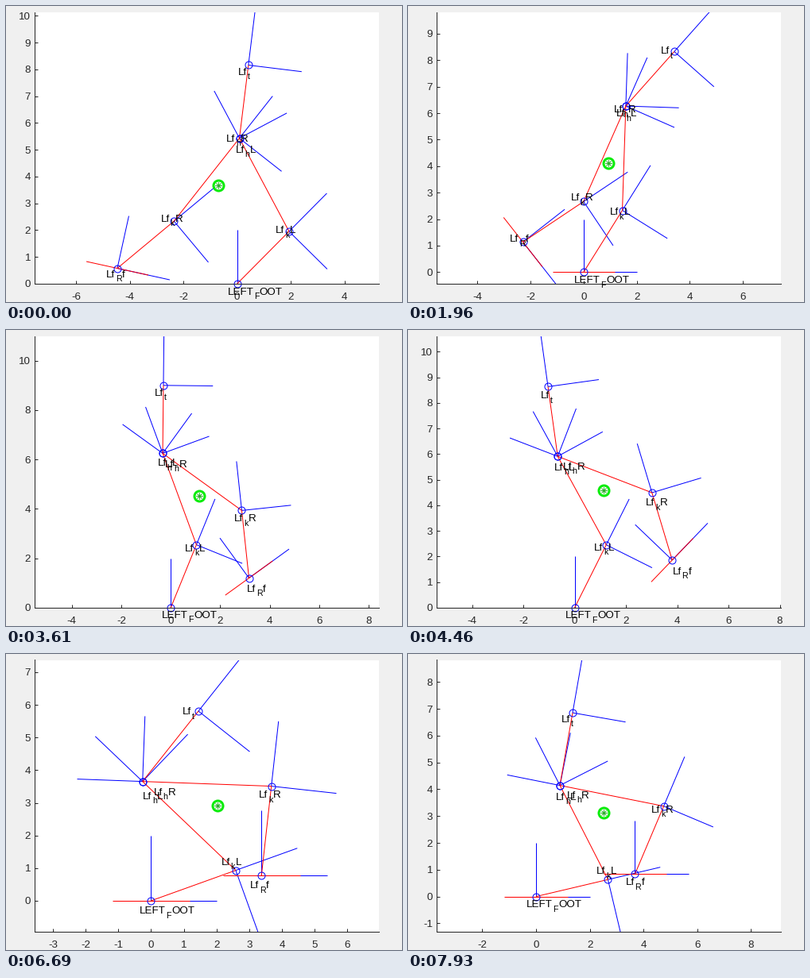
Animation, 498 px wide and 373 px high, one loop 8000 ms. Source, as a matplotlib script:

```python
import math

import numpy as np
import matplotlib.pyplot as plt
from matplotlib.animation import FuncAnimation
from matplotlib.collections import LineCollection
from matplotlib.textpath import TextPath
from matplotlib.ticker import FuncFormatter, MultipleLocator

W, H = 498, 373
LEFT, RIGHT, TOP, BOTTOM = 36, 469, 7.5, 350
LOOP, INTERVAL, STEPS = 8000, 40, 56
SHANK, THIGH, TORSO, FOOT, AXIS = 2.75, 3.94, 2.75, 1.18, 2.0
FONT, SUB = 13.33, 10.67
INK = "#262626"

plt.rcParams.update({"font.family": "Liberation Sans", "font.size": FONT,
                     "axes.unicode_minus": False})

# Key poses of the stride: link directions in degrees at a few steps.
KEY_STEPS = np.array([0, 14, 21, 32, 39, 47, 56])
POSES = np.array([
    [45.3, 58, 69.3, 63.4, 41.4, 19.8, 13.3],            # left shank
    [118, 88.1, 103.2, 118.7, 136.3, 136.3, 117],        # left thigh
    [83, 48.4, 76, 97.9, 82.3, 51.6, 80.1],              # torso
    [231.8, 246.2, 300.6, 338.9, 339.5, 357.9, 348.7],   # right thigh
    [219.8, 213.8, 258.4, 286.7, 269.8, 263.7, 247.1],   # right shank
    [-12.4, -51.9, 17.2, 46.2, 0, 0, 0],                 # right foot
]).T

LABELS = ["LEFT_FOOT", "Lf_kL", "Lf_hL", "Lf_t", "Lf_hR", "Lf_kR", "Lf_Rf"]


def unit(deg):
    a = math.radians(deg)
    return np.array([math.cos(a), math.sin(a)])


def monotone(x, xs, ys):
    """Cubic through the points, without overshoot."""
    h = np.diff(xs)
    s = np.diff(ys, axis=0) / h[:, None]
    m = np.vstack([s[:1], np.zeros_like(s[1:]), s[-1:]])
    p = s[:-1] * s[1:]
    same = p > 0
    m[1:-1][same] = 2 * p[same] / (s[:-1] + s[1:])[same]
    k = min(np.searchsorted(xs, x, side="right") - 1, len(h) - 1)
    u = (x - xs[k]) / h[k]
    return ((1 + 2 * u) * (1 - u) ** 2 * ys[k] + u * (1 - u) ** 2 * h[k] * m[k]
            + u * u * (3 - 2 * u) * ys[k + 1] + u * u * (u - 1) * h[k] * m[k + 1])


def advance(text, size):
    def right(s):
        return TextPath((0, 0), s, size=size).get_extents().x1
    return right(text + "|") - right("|")


fig = plt.figure(figsize=(W / 72, H / 72), dpi=72, facecolor="#f0f0f0")
ax = fig.add_axes([LEFT / W, 1 - BOTTOM / H, (RIGHT - LEFT) / W, (BOTTOM - TOP) / H])
for side in ("top", "right"):
    ax.spines[side].set_visible(False)
for side in ("left", "bottom"):
    ax.spines[side].set(color=INK, linewidth=1)
ax.tick_params(direction="in", length=4, width=1, color=INK, labelcolor=INK)
ax.tick_params(axis="x", pad=10.5)
ax.tick_params(axis="y", pad=5)
for axis in (ax.xaxis, ax.yaxis):
    axis.set_major_formatter(FuncFormatter(lambda v, _: f"{round(v)}"))

blue = LineCollection([], colors="#0000ff", linewidths=1, zorder=2)
red = LineCollection([], colors="#ff0000", linewidths=1, zorder=2.1)
for lines in (blue, red):
    ax.add_collection(lines, autolim=False)
dots, = ax.plot([], [], "o", ms=9, mfc="none", mec="#0000ff", mew=1,
                clip_on=False, zorder=2.2)
ring, = ax.plot([], [], "o", ms=13, mfc="none", mec="#08ec08", mew=3, zorder=2.4)
star, = ax.plot([], [], marker=(8, 2, 0), ms=8, mec="#30b030", mew=0.8, zorder=2.4)


def make_label(name):
    """Plain text whose first letter after the underscore is a subscript."""
    head, tail = name.split("_")
    parts = []
    x = 0
    for text, size, dy in ((head, FONT, -2), (tail[0], SUB, -7.5),
                           (tail[1:], FONT, -2)):
        if text:
            parts.append(ax.annotate(
                text, (0, 0), xytext=(x, dy), textcoords="offset points",
                size=size, color="black", ha="left", va="baseline",
                annotation_clip=False, zorder=3))
            x += math.ceil(advance(text, size))
    return parts


labels = [make_label(name) for name in LABELS]


def fit_view(points):
    """Tight in y, centred in x, equal units."""
    lo, hi = points.min(axis=0), points.max(axis=0)
    span_y = hi[1] - lo[1]
    span_x = span_y * (RIGHT - LEFT) / (BOTTOM - TOP)
    mid = (lo[0] + hi[0]) / 2
    ax.set_xlim(mid - span_x / 2, mid + span_x / 2)
    ax.set_ylim(lo[1], hi[1])
    for axis, span in ((ax.xaxis, span_x), (ax.yaxis, span_y)):
        axis.set_major_locator(MultipleLocator(1 if span <= 10.8 else 2))


def draw(i):
    # The pose is held between steps.
    step = int((i * INTERVAL + 135) * STEPS / LOOP)
    a, b, c, d, e, f = monotone(step, KEY_STEPS, POSES)

    foot = np.zeros(2)
    knee = SHANK * unit(a)
    hip = knee + THIGH * unit(b)
    head = hip + TORSO * unit(c)
    knee_r = hip + THIGH * unit(d)
    foot_r = knee_r + SHANK * unit(e)
    com = 0.2 * (knee + hip + head + knee_r) + 0.16 * foot_r

    origins = [foot, knee, hip, head, hip, knee_r, foot_r]
    turns = [0, a - 90, b - 90, c - 90, d + 90, e + 90, f]
    arms = [(o, o + AXIS * unit(q + r))
            for o, q in zip(origins, turns) for r in (0, 90)]
    bones = [(foot, knee), (knee, hip), (hip, head), (hip, knee_r), (knee_r, foot_r)]
    bones += [(o - FOOT * unit(q), o + FOOT * unit(q))
              for o, q in ((foot, 0), (foot_r, f))]

    blue.set_segments(arms)
    red.set_segments(bones)
    dots.set_data(*np.transpose(origins))
    for mark in (ring, star):
        mark.set_data([com[0]], [com[1]])
    for parts, o, q in zip(labels, origins, turns):
        for part in parts:
            part.xy = o + 0.495 * unit(q + 225)
    fit_view(np.array(arms + bones).reshape(-1, 2))
    return []


anim = FuncAnimation(fig, draw, frames=LOOP // INTERVAL, interval=INTERVAL,
                     init_func=lambda: draw(0), repeat=True, repeat_delay=0,
                     blit=False)
plt.show()
```
